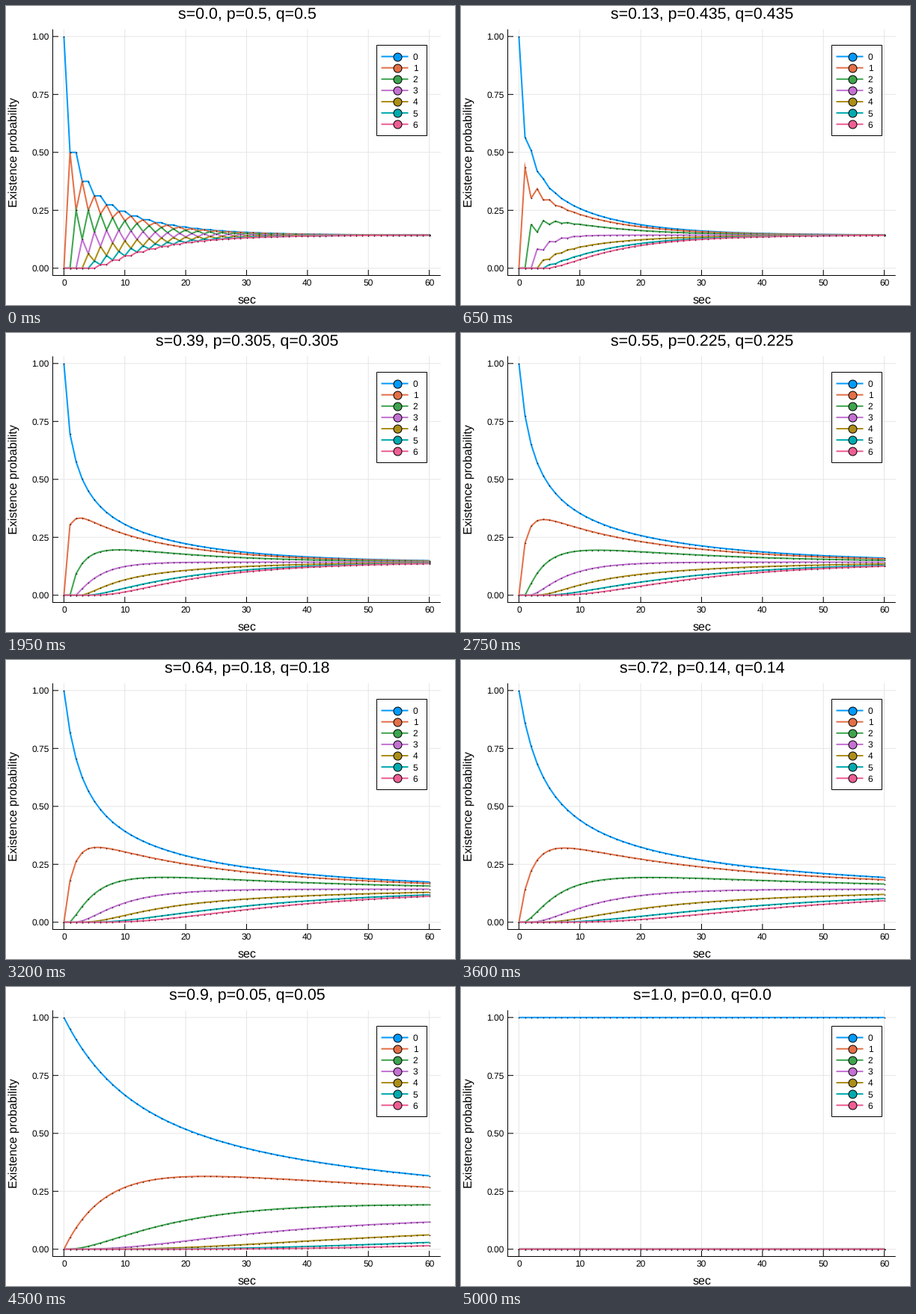
Write a matplotlib script that moves like this. It is 600 px wide and 400 px high and loops after 5.05 s.

```python
import numpy as np
import matplotlib.pyplot as plt
from matplotlib.animation import FuncAnimation
from matplotlib.path import Path
from matplotlib.patches import PathPatch, Rectangle

W, H, DPI = 600, 400, 100
PT = 72 / DPI                      # points per pixel
FRAMES, INTERVAL = 101, 50
STATES, STEPS = 7, 60
COLORS = ["#009afa", "#e36f47", "#3ea44e", "#c371d2",
          "#ac8e18", "#00aaae", "#ed5e93"]
LINE_W = 2.0
LEFT, RIGHT, TOP, BOTTOM = 62.5, 580.3, 31.7, 360.5
TICK, GUIDE, TITLE = 12, 16, 21.4  # text sizes in pixels

plt.rcParams["font.family"] = "Liberation Sans"
plt.rcParams["text.hinting"] = "none"
fig = plt.figure(figsize=(W / DPI, H / DPI), dpi=DPI, facecolor="white")
ax = fig.add_axes([0, 0, 1, 1])
ax.set_xlim(0, W)
ax.set_ylim(H, 0)
ax.axis("off")


def px(t):
    return 77.4 + 488.2 * np.asarray(t) / STEPS


def py(v):
    return 350.8 - 310 * np.asarray(v)


def stroke(xs, ys, color="black", width=1.0, z=1, **kw):
    return ax.plot(xs, ys, color=color, lw=width * PT, zorder=z,
                   snap=False, **kw)[0]


def label(x, y, text, size, ha="center", va="baseline", **kw):
    return ax.text(x, y, text, fontsize=size * PT, ha=ha, va=va, **kw)


def walk(s, p, q):
    """Occupation probabilities of a lazy walk with sticky ends."""
    m = s * np.eye(STATES) + p * np.eye(STATES, k=-1) + q * np.eye(STATES, k=1)
    m[0, 0] += q
    m[-1, -1] += p
    rows = [np.eye(STATES)[0]]
    for _ in range(STEPS):
        rows.append(m @ rows[-1])
    return np.array(rows)


def spikes(x, y):
    """Pointed tips for joins too sharp for the renderer's own miter."""
    pts = np.column_stack([x, y])
    d = np.diff(pts, axis=0)
    d /= np.linalg.norm(d, axis=1)[:, None]
    verts, codes = [], []
    for v, a, b in zip(pts[1:-1], d[:-1], d[1:]):
        half_sin = np.linalg.norm(a + b) / 2
        if not 0.1 < half_sin < 0.25:
            continue
        out = (a - b) / np.linalg.norm(a - b)
        corners = []
        for e in (a, b):
            n = np.array([-e[1], e[0]])
            corners.append(v + n * np.sign(n @ out) * LINE_W / 2)
        tip = v + out * LINE_W / 2 / half_sin
        verts += [v, corners[0], tip, corners[1], v]
        codes += [Path.MOVETO] + [Path.LINETO] * 3 + [Path.CLOSEPOLY]
    return Path(np.array(verts).reshape(-1, 2), codes or None)


# axes, grid and tick labels
for t in range(0, STEPS + 1, 10):
    x = px(t)
    stroke([x, x], [TOP, BOTTOM], "#e6e6e6")
    stroke([x, x], [BOTTOM, BOTTOM - 7], z=2)
    label(x, 374, str(t), TICK)
for v in (0, 0.25, 0.5, 0.75, 1):
    y = py(v)
    stroke([LEFT, RIGHT], [y, y], "#e6e6e6")
    stroke([LEFT, LEFT + 7], [y, y], z=2)
    label(57.5, y + 4.2, f"{v:.2f}", TICK, ha="right")
stroke([LEFT, LEFT], [TOP, BOTTOM], z=2)
stroke([LEFT, RIGHT], [BOTTOM, BOTTOM], z=2)

label(321.5, 398, "sec", GUIDE)
label(15, 196, "Existence probability", GUIDE, rotation=90,
      rotation_mode="anchor")
title = label(322, 18, "", TITLE)

# data series
lines, dots, tips = [], [], []
for k, c in enumerate(COLORS):
    z = 3 + k * 0.1
    lines.append(stroke([], [], c, LINE_W, z, solid_joinstyle="miter",
                        solid_capstyle="butt"))
    tips.append(ax.add_patch(PathPatch(Path(np.zeros((0, 2))), fc=c, lw=0,
                                       zorder=z + 0.02)))
    dots.append(stroke([], [], c, 0, z + 0.05, marker="o", ms=1.1 * PT,
                       mfc=c, mec="black", mew=0.5 * PT))

# legend
ax.add_patch(Rectangle((495.5, 52.5), 67, 121, fc="white", ec="black",
                       lw=PT, zorder=5, snap=False))
for k, c in enumerate(COLORS):
    y = 67.6 + 15.1 * k
    stroke([501.5, 537.5], [y, y], c, LINE_W, 6, solid_capstyle="butt")
    stroke([522.5], [y], c, 0, 7, marker="o", ms=11 * PT, mfc=c,
           mec="black", mew=PT)
    label(543.7, y + 4.4, str(k), TICK, ha="left", zorder=7)


def draw(i):
    s = round(i / 100, 2)
    p = round((1 - s) / 2, 3)
    title.set_text(f"s={s}, p={p}, q={p}")
    prob = walk(s, p, p)
    x = px(np.arange(STEPS + 1))
    for k in range(STATES):
        y = py(prob[:, k])
        lines[k].set_data(x, y)
        dots[k].set_data(x, y)
        tips[k].set_path(spikes(x, y))
    return [title, *lines, *tips, *dots]


anim = FuncAnimation(fig, draw, frames=FRAMES, interval=INTERVAL,
                     repeat=True, repeat_delay=0)
plt.show()
```
